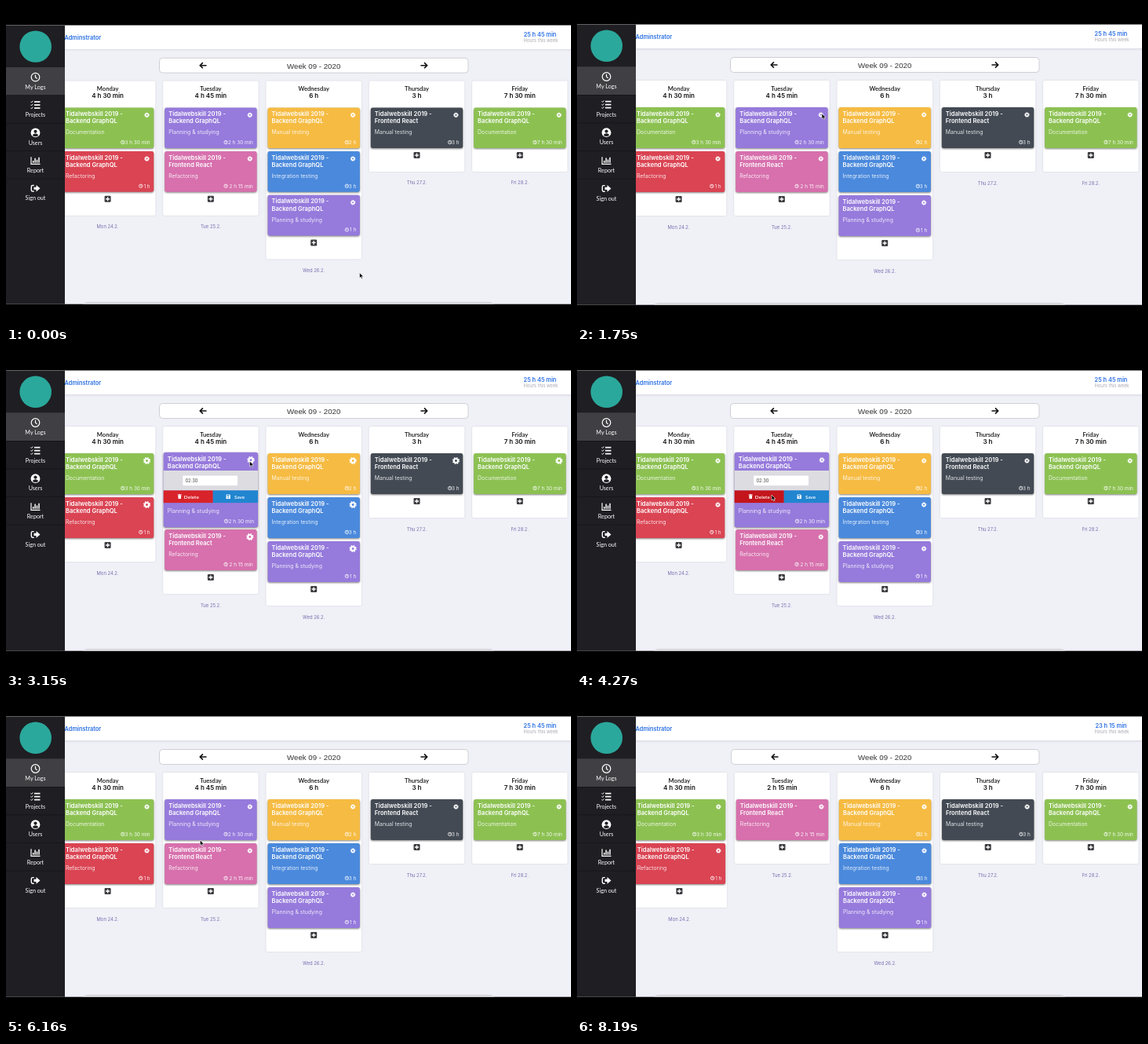
An HTML page for the animation above (8750 ms loop, 720 by 405 pixels).

```html
<!DOCTYPE html>
<html lang="en">
<head>
<meta charset="utf-8">
<title>Weekly work log</title>
<style>
  html, body { margin: 0; width: 100%; height: 100%; overflow: hidden; background: #000; }
  svg { display: block; }
  text { font-family: Inter, "Open Sans", sans-serif; }
  .lato { font-family: Lato, sans-serif; }
  .arial { font-family: "Liberation Sans", Arial, sans-serif; }
  .mid { text-anchor: middle; }
  .end { text-anchor: end; }
  .bold { font-weight: 600; }
  .card { filter: drop-shadow(0 1px 1.2px rgba(0, 0, 0, .5)); }
  .sheet { filter: drop-shadow(0 .5px 1px rgba(0, 0, 30, .12)); }
</style>
</head>
<body>
<svg id="stage" width="720" height="405" viewBox="0 0 720 405">
  <g id="screen">
    <rect y="23.7" width="720" height="357" fill="#f0f0f7"/>
    <path d="M98 380.7q2-3 8-3H614q6 0 8 3z" fill="#d9d9dd"/>
    <g id="page"></g>
    <g id="sidebar"></g>
    <path id="cursor" d="M0 0V6.8L1.6 5.4L2.7 7.9L3.9 7.4L2.8 5H5z" fill="#000" stroke="#fff" stroke-width=".6"/>
  </g>
</svg>
<script>
const LOOP = 8750, ZOOM = 560, OPEN = 2150, CLOSE = 5500, SLIDE = 300, REMOVE = 6790, HIDE = 7840;
const PANEL = 41;
const COLOR = { green: '#8cc152', red: '#da4453', purple: '#967adc', pink: '#d770ad',
                yellow: '#f6bb42', blue: '#4a89dc', dark: '#434a54' };
const BACK = 'Backend GraphQL', FRONT = 'Frontend React';
const WEEK = [
  ['Monday', '4 h 30 min', 'Mon 24.2.', [['green', BACK, 'Documentation', '3 h 30 min'], ['red', BACK, 'Refactoring', '1 h']]],
  ['Tuesday', '4 h 45 min', 'Tue 25.2.', [['purple', BACK, 'Planning & studying', '2 h 30 min'], ['pink', FRONT, 'Refactoring', '2 h 15 min']]],
  ['Wednesday', '6 h', 'Wed 26.2.', [['yellow', BACK, 'Manual testing', '2 h'], ['blue', BACK, 'Integration testing', '3 h'], ['purple', BACK, 'Planning & studying', '1 h']]],
  ['Thursday', '3 h', 'Thu 27.2.', [['dark', FRONT, 'Manual testing', '3 h']]],
  ['Friday', '7 h 30 min', 'Fri 28.2.', [['green', BACK, 'Documentation', '7 h 30 min']]]
];
// Pointer stops: time, x, y
const PATH = [[0, 450.5, 340.5], [840, 450.5, 340.5], [1400, 312, 137], [1800, 312, 137], [2100, 310.5, 139],
              [3350, 310.5, 139], [3950, 248, 182], [5500, 248, 182], [5800, 247.3, 181], [LOOP, 247.3, 181]];

const $ = id => document.getElementById(id);
const ease = p => (p = Math.min(1, Math.max(0, p)), p * p * (3 - 2 * p));
const rect = (x, y, w, h, fill, more = '') =>
  `<rect x="${x}" y="${y}" width="${w}" height="${h}" fill="${fill}" ${more}/>`;
const text = (x, y, size, fill, str, cls = '') =>
  `<text x="${x}" y="${y}" font-size="${size}" fill="${fill}" class="${cls}">${str.replace('&', '&amp;')}</text>`;
const line = (d, color, width, more = '') =>
  `<path d="${d}" fill="none" stroke="${color}" stroke-width="${width}" ${more}/>`;
const group = (x, y, body, scale = 1) => `<g transform="translate(${x} ${y}) scale(${scale})">${body}</g>`;

const clock = (x, y, r, w) => group(x, y,
  `<circle r="${r}" fill="none" stroke="#fff" stroke-width="${w}"/>` + line(`M0 ${-r * .6}V0L${r * .4} ${r * .35}`, '#fff', w));
const gear = (x, y, scale) => group(x, y,
  '<circle r="1.8" fill="none" stroke="#fff" stroke-width="1.5"/>' +
  '<circle r="2.8" fill="none" stroke="#fff" stroke-width="1" stroke-dasharray="1.2 1"/>', scale);
const arrow = (x, dir) => group(x, 75,
  line(`M${-4.2 * dir} 0H${3.6 * dir}M${.4 * dir} -3.6L${4 * dir} 0L${.4 * dir} 3.6`, '#111', 1.6));

function editor(x, hot) {
  return rect(x, 0, 117.4, 25, '#dcdce1') +
    rect(x + 23.5, 6, 69, 13, '#fff', 'rx="1.5" stroke="#cfcfd4" stroke-width=".5"') +
    text(x + 27, 14.8, 5.6, '#444', '02:30') +
    rect(x, 24.8, 61.5, 15.4, hot ? '#c4151c' : '#d8232a') +
    rect(x + 61.5, 24.8, 55.9, 15.4, '#2185d0') +
    group(x + 20, 32.5, '<path d="M-2 -1.6H2L1.6 2.8H-1.6zM-2.5 -2.7H-1L-.6 -3.2H.6L1 -2.7H2.5V-2H-2.5z" fill="#fff"/>') +
    text(x + 25.5, 35, 6.3, '#fff', 'Delete', 'lato bold') +
    group(x + 80.5, 32.5, '<path d="M-2.6 -2.6H1.6L2.6 -1.6V2.6H-2.6z" fill="#fff"/>' +
      rect(-1.7, -1.9, 2.8, 1.3, '#2185d0') + '<circle cy="1" r=".8" fill="#2185d0"/>') +
    text(x + 88, 35, 6.3, '#fff', 'Save', 'lato bold');
}

function card([color, title, task, time], x, y, open = 0, state = {}) {
  const right = x + 112.7, grow = PANEL * open, s = 1 + .025 * open;
  const cx = x + 58.7, cy = y + 26 + grow / 2;
  const body = rect(x, y, 117.4, 52 + grow, COLOR[color], 'rx="2.5" class="card"') +
    text(x + 5, y + 10.6, 7.57, '#fff', 'Tidalwebskill 2019 -', 'bold') +
    text(x + 5, y + 20, 7.57, '#fff', title, 'bold') +
    gear(x + 108.6, y + 9.5, state.gearHot ? 1.4 : 1) +
    (open ? `<svg x="0" y="${y + 22.5}" width="720" height="${grow}">${editor(x, state.deleteHot)}</svg>` : '') +
    group(0, grow,
      text(x + 5, y + 34, 6.9, '#ffffffd8', task) +
      clock(right - 3.28 * time.length - 2, y + 44.4, 2.2, .8) +
      text(right, y + 46.7, 6.4, '#ffffffe8', time, 'end'));
  return `<g transform="translate(${cx} ${cy}) scale(${s}) translate(${-cx} ${-cy})">${body}</g>`;
}

function column([day, total, date, cards], i, state) {
  const x = 68.9 + 131.3 * i + (state.removed ? Math.max(0, .8 - .2 * i) : 0);
  const isTuesday = i === 1, mid = x + 60.7;
  if (isTuesday && state.removed) { cards = cards.slice(1); total = '2 h 15 min'; }
  const open = isTuesday ? state.open : 0;
  const bottom = 155 + 56 * cards.length + PANEL * open;
  const items = cards.map((c, n) =>
    card(c, x + 2, 129 + 56 * n + (n ? PANEL * open : 0), n ? 0 : open, state));
  return rect(x, 95, 121.4, bottom - 95, '#fff', 'rx="2" class="sheet"') +
    text(mid, 107.6, 7.6, '#111', day, 'lato bold mid') +
    text(mid, 117, 8, '#111', total, 'bold mid') +
    items.reverse().join('') +
    group(mid, bottom - 21, rect(-4, -4, 8, 8, '#3b3b3f', 'rx="1.2"') + line('M-2.5 0H2.5M0 -2.5V2.5', '#fff', 1.3)) +
    text(mid, bottom + 16.6, 5.9, '#746fae', date, 'mid');
}

function page(state) {
  const left = state.removed ? 196 : 195;
  return rect(0, 54, 720, 1, '#dedee8') + rect(0, 55, 720, 1.5, '#e8e8f0') + rect(0, 23.7, 720, 30.3, '#fff') +
    text(74.5, 42, 7.4, '#2b70e4', 'Adminstrator', 'bold') +
    text(680.5, 38.3, 7.4, '#2b70e4', state.removed ? '23 h 15 min' : '25 h 45 min', 'bold mid') +
    text(681.5, 45, 5.8, '#a9a9b2', 'Hours this week', 'mid') +
    rect(left + .5, 65.5, 588.5 - left, 19, '#fff', 'rx="4" stroke="#cfcfd4"') +
    arrow(left + 56.3, -1) + arrow(532.6, 1) +
    text(392.2, 79, 9.7, '#333', 'Week 09 - 2020', 'arial mid') +
    WEEK.map((c, i) => column(c, i, state)).join('');
}

function sidebar() {
  const ticks = [-4, 0, 4].map(y =>
    line(`M-1.5 ${y}H6`, '#fff', 1.7) + line(`M-6 ${y - .2}l1 1l1.8 -2`, '#fff', 1)).join('');
  const icons = [
    clock(0, 0, 5.3, 1.2),
    ticks,
    '<circle r="5.9" fill="#fff"/><circle cy="-1.6" r="2.1" fill="#201f24"/><path d="M-3.6 3.6Q-3.2 1.1 0 1.1T3.6 3.6Q0 6 -3.6 3.6" fill="#201f24"/>',
    line('M-5.5 -4.5V4.5H6', '#fff', 1.2) + line('M-2.8 3V.2M-.4 3V-3.2M2 3V-1.2M4.5 3V-4', '#fff', 1.5),
    '<path d="M-2 -1.6H1V-4.3L6 0L1 4.3V1.6H-2z" fill="#fff"/>' + line('M-1.8 -3.8H-3.6Q-5.2 -3.8 -5.2 -2.2V2.2Q-5.2 3.8 -3.6 3.8H-1.8', '#fff', 1.4)
  ];
  return rect(0, 23.7, 75, 357, '#1f1e23') + rect(0, 77.3, 75, 35.7, '#403f43') +
    '<circle cx="37.7" cy="50.8" r="20.3" fill="#2aa89b"/>' +
    ['My Logs', 'Projects', 'Users', 'Report', 'Sign out'].map((label, i) => {
      const y = 90 + 35.6 * i;
      return group(37.5, y, icons[i]) + text(37.5, y + 15.2, 7.2, '#fff', label, 'lato mid') +
        (i < 4 ? rect(0, y + 23, 75, .6, '#121115') : '');
    }).join('');
}

function pointer(t) {
  const i = PATH.findIndex(p => p[0] > t), [t0, x0, y0] = PATH[i - 1], [t1, x1, y1] = PATH[i];
  const p = ease((t - t0) / (t1 - t0));
  return [x0 + (x1 - x0) * p, y0 + (y1 - y0) * p];
}

let shown;
function draw() {
  const t = performance.now() % LOOP, [x, y] = pointer(t);
  const open = ease((t - OPEN) / SLIDE) - ease((t - CLOSE) / SLIDE);
  const state = {
    open,
    removed: t >= REMOVE,
    gearHot: open > 0 && x > 305,
    deleteHot: x < 264 && y > 176
  };
  const key = JSON.stringify(state);
  if (key !== shown) { $('page').innerHTML = page(state); shown = key; }
  $('screen').setAttribute('transform', t < ZOOM ? 'matrix(1 0 0 .9944 0 1.13)' : '');
  $('cursor').setAttribute('transform', `translate(${x} ${y})`);
  $('cursor').setAttribute('visibility', t < HIDE ? 'visible' : 'hidden');
  requestAnimationFrame(draw);
}

$('sidebar').innerHTML = sidebar();
draw();
</script>
</body>
</html>
```
